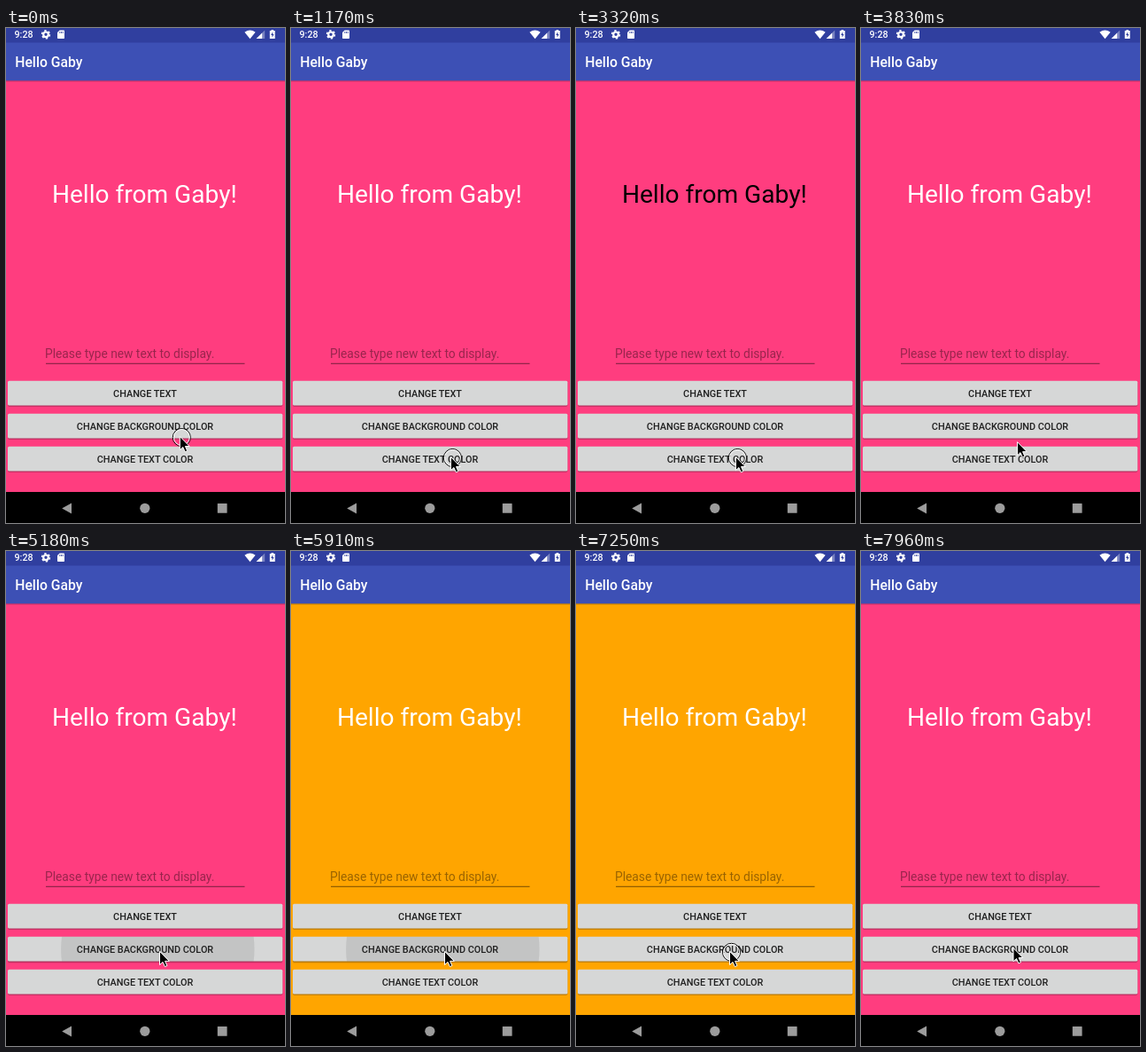
Recreate the animation shown at these times as an HTML page. Size 315 by 558 pixels, loop 7990 ms.

```html
<!DOCTYPE html>
<html lang="en">
<head>
<meta charset="utf-8">
<title>Hello Gaby</title>
<style>
  html, body { margin: 0; width: 100%; height: 100%; overflow: hidden; background: #000; }
  svg { display: block; width: 315px; height: 558px; font-family: Roboto, "Open Sans", sans-serif; }
  .label { font-size: 10.85px; font-weight: 500; fill: #1f1f1f; text-anchor: middle; }
  .icon { fill: #fff; }
  .nav { fill: #9c9c9c; }
</style>
</head>
<body>
<svg viewBox="0 0 315 558">
  <defs>
    <linearGradient id="drop" x1="0" y1="0" x2="0" y2="1">
      <stop offset="0" stop-opacity=".25"/>
      <stop offset="1" stop-opacity="0"/>
    </linearGradient>
  </defs>

  <rect id="page" y="59" width="315" height="464" fill="#ff3d7f"/>
  <rect y="59" width="315" height="2.5" fill="url(#drop)"/>
  <rect width="315" height="17" fill="#303f9f"/>
  <rect y="16.5" width="315" height="42.8" fill="#3d50b5"/>

  <!-- status bar -->
  <text x="9.5" y="11.4" font-size="10.7" font-weight="500" fill="#fff">9:28</text>
  <g class="icon">
    <circle cx="45" cy="7.3" r="2.8" fill="none" stroke="#fff" stroke-width="2.2"/>
    <circle cx="45" cy="7.3" r="4.4" fill="none" stroke="#fff" stroke-width="1.6" stroke-dasharray="2.3 2.308"/>
    <path d="M60.6 2.5H65.2Q66 2.5 66 3.3V11.2Q66 12 65.2 12H58.8Q58 12 58 11.2V5.1Z"/>
    <path d="M60.8 4V6M62.5 4V6M64.2 4V6" stroke="#303f9f" stroke-width=".8"/>
    <path d="M269.4 4.8Q275.5 .2 281.6 4.8L275.5 12.2Z"/>
    <path d="M292.2 2.4V12H282.6Z" opacity=".35"/>
    <path d="M289.2 5.4V12H282.6Z"/>
    <path d="M299.5 2H302V3H303.7V12H297.8V3H299.5Z"/>
    <path d="M301.2 4.3L299.1 8H300.5V10.8L302.5 7H301.2Z" fill="#303f9f"/>
  </g>

  <text x="10.3" y="44" font-size="15.7" font-weight="500" fill="#fff">Hello Gaby</text>
  <text id="greeting" x="51.9" y="197.4" font-size="28.1" fill="#fff">Hello from Gaby!</text>
  <text x="44" y="372.3" font-size="13.79" fill-opacity=".4">Please type new text to display.</text>
  <rect x="45" y="377.8" width="224.5" height=".9" fill-opacity=".6"/>

  <g id="buttons"></g>

  <!-- navigation bar -->
  <rect y="523" width="315" height="35"/>
  <g class="nav">
    <path d="M63.2 541.4L74 535.4V547.4Z"/>
    <circle cx="156.8" cy="541.3" r="5.6"/>
    <rect x="238.8" y="536" width="10.8" height="10.8" rx=".6"/>
  </g>

  <g id="pointer">
    <g id="ring" fill="none">
      <circle cx="2" cy="1" r="10" stroke="#000"/>
      <circle cx="2" cy="1" r="9" stroke="#fff"/>
    </g>
    <path d="M0 0V15.2L3.5 12L5.9 17.3L8.4 16.2L6.1 11H10.8Z" stroke="#fff" stroke-width="1" stroke-linejoin="round"/>
  </g>
</svg>

<script>
const LOOP = 7990;
const $ = id => document.getElementById(id);

// time, x, y of the pointer tip
const path = [
  [0, 196.3, 460.5], [29, 196.3, 460.5], [30, 195.5, 462.5], [200, 189, 474],
  [400, 184, 482], [550, 182.3, 484], [699, 182.3, 484], [700, 181.4, 483.5],
  [729, 181.4, 483.5], [730, 180.4, 483.5], [3690, 180.4, 483.5], [3830, 176.5, 466.7],
  [3980, 174, 457.5], [4110, 173, 453.8], [4139, 173, 453.8], [4140, 173, 452.6],
  [4189, 173, 452.6], [4190, 173.5, 451.3], [7929, 173.5, 451.3], [7930, 172.8, 449.5],
  [7959, 172.8, 449.5], [7960, 172, 447.5], [LOOP, 172, 447.5]
];
const textClicks = [1170, 1880, 2580, 3320];
const pageClicks = [5090, 5820, 6520, 7250];
const CHANGE = 120;   // delay from press to colour change
const RING = 60;      // how long the click ring shows

const buttons = ["CHANGE TEXT", "CHANGE BACKGROUND COLOR", "CHANGE TEXT COLOR"].map((name, i) => {
  const y = 397.8 + i * 37;
  const box = `x="2" width="310.3" height="27.8" rx="1.6"`;
  $("buttons").insertAdjacentHTML("beforeend", `
    <clipPath id="clip${i}"><rect ${box} y="${y}"/></clipPath>
    <rect ${box} y="${y + 2.6}" fill-opacity="0" id="lift${i}"/>
    <rect ${box} y="${y + 1.1}" fill-opacity=".28"/>
    <rect ${box} y="${y}" fill="#d6d7d7"/>
    <circle id="ripple${i}" cy="${y + 14}" clip-path="url(#clip${i})"/>
    <text class="label" x="157" y="${y + 18}">${name}</text>`);
  return { ripple: $("ripple" + i), lift: $("lift" + i) };
});

const clamp = v => Math.max(0, Math.min(1, v));

function pointerAt(t) {
  const i = Math.max(1, path.findIndex(p => p[0] > t));
  const [t0, x0, y0] = path[i - 1], [t1, x1, y1] = path[i];
  const k = (t - t0) / (t1 - t0);
  return [x0 + (x1 - x0) * k, y0 + (y1 - y0) * k];
}

// time since the latest press
function sincePress(clicks, t) {
  return t - Math.max(-LOOP, ...clicks.filter(c => c <= t));
}

function toggled(clicks, t) {
  return clicks.filter(c => t >= c + CHANGE).length % 2 === 1;
}

function press({ ripple, lift }, age, x) {
  const on = age > 62 && age < 370;
  const fade = on ? 1 - clamp((age - 200) / 170) : 0;
  const k = clamp((age - 62) / 65);
  ripple.setAttribute("r", on ? Math.min(185, 107 + (age - 90) * 2.2) : 0);
  ripple.setAttribute("cx", x + (157 - x) * k * .3);
  ripple.setAttribute("fill-opacity", .09 * fade);
  lift.setAttribute("fill-opacity", .12 * fade * k);
}

function draw(t) {
  const [x, y] = pointerAt(t);
  const textAge = sincePress(textClicks, t), pageAge = sincePress(pageClicks, t);
  const ringOn = t < 30 || textAge < RING || pageAge < RING;
  $("pointer").setAttribute("transform", `translate(${x} ${y})`);
  $("ring").setAttribute("visibility", ringOn ? "visible" : "hidden");
  $("greeting").setAttribute("fill", toggled(textClicks, t) ? "#000" : "#fff");
  $("page").setAttribute("fill", toggled(pageClicks, t) ? "#ffa500" : "#ff3d7f");
  press(buttons[2], textAge, x);
  press(buttons[1], pageAge, x);
}

const start = performance.now();
function tick() {
  draw((performance.now() - start) % LOOP);
  requestAnimationFrame(tick);
}
tick();
</script>
</body>
</html>
```
